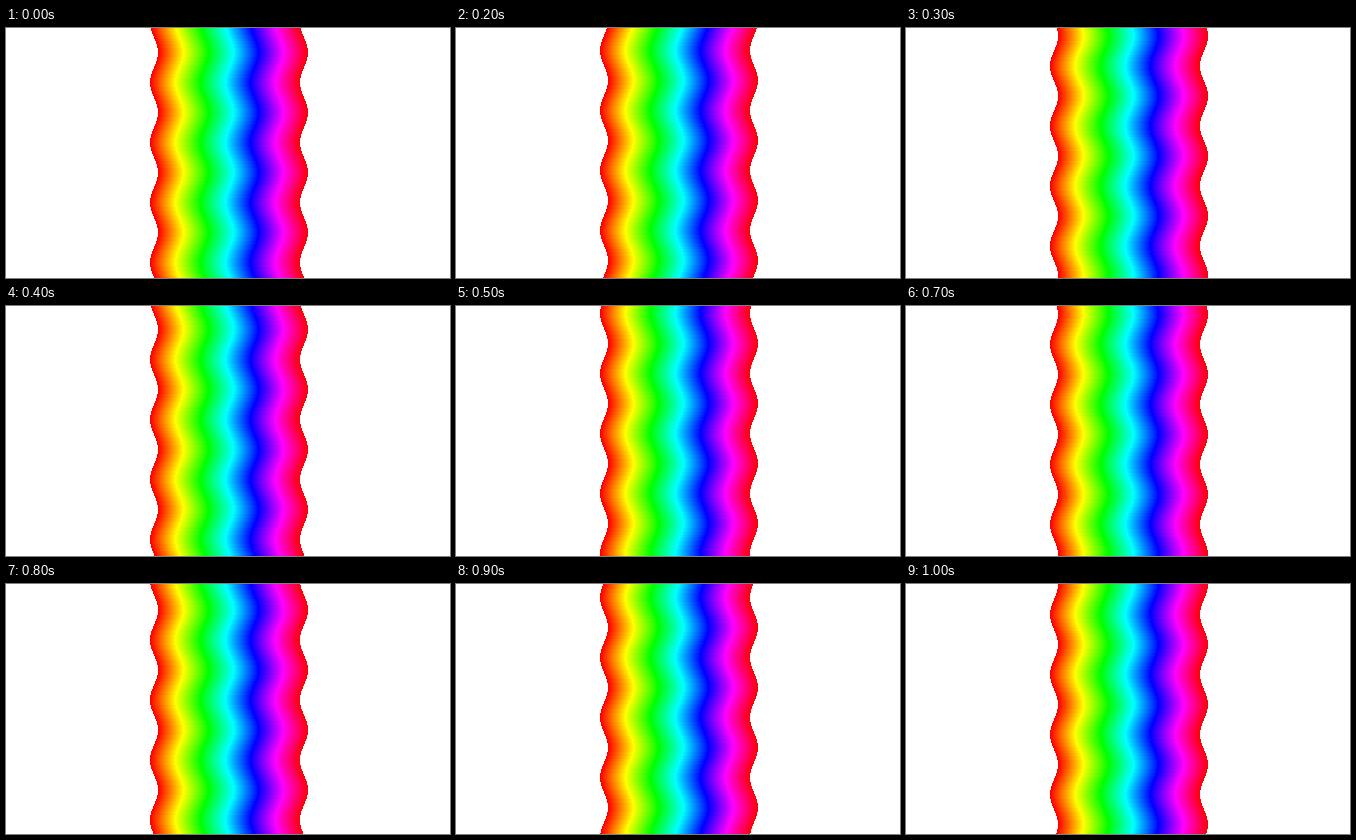
Animation of 444x250 px, one loop 1.1 s. Source, as an HTML page with a canvas:

```html
<!DOCTYPE html>
<html lang="en">
<head>
<meta charset="utf-8">
<title>Rainbow wave</title>
<style>
html, body { margin: 0; width: 100%; height: 100%; overflow: hidden; background: #fff; }
canvas { display: block; }
</style>
</head>
<body>
<canvas id="stage" width="444" height="250"></canvas>
<script>
const ctx = document.getElementById('stage').getContext('2d');
const STEP = 100, BAND = 150, PERIOD = 60, CENTER = 148, SWING = 4;
// Height of a leftmost crest at each step of the loop
const crests = [54, 68, 82, 97.5, 113, 127, 141, 158, 175.5, 193, 210];

// One row of the full hue circle, reused for every line
const row = document.createElement('canvas');
row.width = BAND;
row.height = 1;
const rowCtx = row.getContext('2d');
for (let x = 0; x < BAND; x++) {
  rowCtx.fillStyle = `hsl(${360 * x / BAND}, 100%, 50%)`;
  rowCtx.fillRect(x, 0, 1, 1);
}

function draw(time) {
  const crest = crests[Math.floor(time / STEP) % crests.length];
  ctx.fillStyle = '#fff';
  ctx.fillRect(0, 0, 444, 250);
  for (let y = 0; y < 250; y++) {
    const angle = 2 * Math.PI * (y - crest) / PERIOD;
    ctx.drawImage(row, Math.round(CENTER - SWING * Math.cos(angle)), y);
  }
}

const start = performance.now();
function tick() {
  draw(performance.now() - start);
  requestAnimationFrame(tick);
}
tick();
</script>
</body>
</html>
```
